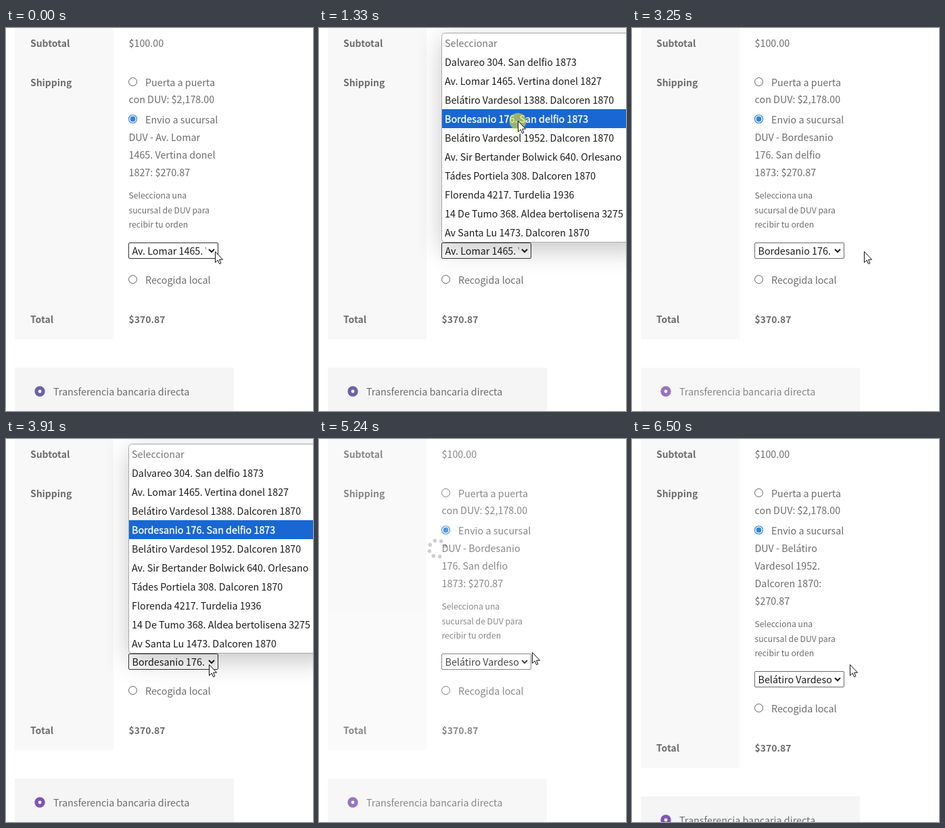
An HTML page that plays this animation: 454 by 566 pixels, repeating every 6.89 s.

```html
<!DOCTYPE html>
<html lang="es">
<head>
<meta charset="utf-8">
<title>Checkout</title>
<style>
  html, body { margin: 0; width: 100%; height: 100%; overflow: hidden; background: #fff; }
  svg { display: block; width: 100%; height: 100%; }
  text { font: 14.32px "Noto Sans CJK JP", "Noto Sans CJK SC", "Noto Sans CJK", "Source Sans Pro", sans-serif; fill: #6d6d6d; }
  text.bold { font-size: 13.95px; font-weight: 600; }
  text.small { font-size: 12.18px; }
  text.dark, #menu text { fill: #1c1c1c; }
  #menu text.hint { fill: #757575; }
  #menu text.on { fill: #fff; stroke: #fff; stroke-width: .35; }
  .off { fill: #fff; stroke: #606060; }
  #menuBox { fill: #fff; stroke: #a8a8a8; filter: drop-shadow(0 11px 18px rgba(0, 0, 0, .22)); }
</style>
</head>
<body>
<svg viewBox="0 0 454 566">
  <defs>
    <clipPath id="fieldClip"><rect x="183" y="318" width="112.5" height="22"/></clipPath>
  </defs>
  <rect id="cell" x="13" y="0" width="146" height="460" fill="#f8f8f8"/>
  <g id="top">
    <circle class="off" cx="187.5" cy="79.5" r="6"/>
    <circle cx="187.5" cy="134.5" r="6" fill="#fff" stroke="#2f83d8" stroke-width="1.2"/>
    <circle cx="187.5" cy="134.5" r="3.9" fill="#2f83d8"/>
  </g>
  <g id="low">
    <rect id="field" x="181.5" y="317.5" width="132" height="23" rx="1.5" fill="#fff"/>
    <g id="fieldText" clip-path="url(#fieldClip)"></g>
    <path d="M300 327l4 4 4-4" fill="none" stroke="#1c1c1c" stroke-width="2"/>
    <circle class="off" cx="187.5" cy="371.5" r="6"/>
    <rect x="13" y="502" width="324" height="90" fill="#f5f5f5"/>
    <circle id="payDot" cx="50" cy="537" r="7.7"/>
    <circle cx="50" cy="537" r="2.4" fill="#fff"/>
  </g>
  <g id="tableVeil">
    <rect x="13" y="0" width="324" height="460" fill="#fff"/>
    <g id="spinner"></g>
  </g>
  <rect id="payVeil" x="13" y="502" width="324" height="90" fill="#fff"/>
  <g id="menu">
    <rect id="menuBox" x="181.5" y="7.5" width="300" height="309" rx="5"/>
    <rect id="bar" x="182" width="300" height="28" fill="#1967d2"/>
  </g>
  <circle id="press" r="12.5" fill="#e2e03c" fill-opacity=".62"/>
  <path id="cursor" d="M.5 .5V16.6L4.2 13.1 6.6 18.6 8.9 17.6 6.6 12.2H11.6Z" fill="#fff" stroke="#111"/>
</svg>
<script>
const LOOP = 6890;
const NS = "http://www.w3.org/2000/svg";
const $ = id => document.getElementById(id);

function add(parent, tag, attrs, content = "") {
  const el = document.createElementNS(NS, tag);
  for (const k in attrs) el.setAttribute(k, attrs[k]);
  el.textContent = content;
  return parent.appendChild(el);
}
const write = (parent, x, y, content, cls = "") =>
  add(parent, "text", { x, y, class: cls }, content);

const upper = $("top"), low = $("low");
write(upper, 36, 28, "Subtotal", "bold");
write(upper, 181.5, 28, "$100.00");
write(upper, 36, 86, "Shipping", "bold");
write(upper, 206, 86, "Puerta a puerta");
write(upper, 181.5, 111, "con DUV: $2,178.00");
write(upper, 206, 141, "Envio a sucursal");
const lines = [167, 193, 219, 245].map(y => write(upper, 181.5, y, ""));

write(low, 181.5, 252, "Selecciona una", "small");
write(low, 181.5, 274, "sucursal de DUV para", "small");
write(low, 181.5, 295, "recibir tu orden", "small");
write(low, 206, 378, "Recogida local");
write(low, 36, 436, "Total", "bold");
write(low, 181.5, 436, "$370.87", "bold");
write(low, 70, 543, "Transferencia bancaria directa");

const options = [
  "Seleccionar",
  "Dalvareo 304. San delfio 1873",
  "Av. Lomar 1465. Vertina donel 1827",
  "Belátiro Vardesol 1388. Dalcoren 1870",
  "Bordesanio 176. San delfio 1873",
  "Belátiro Vardesol 1952. Dalcoren 1870",
  "Av. Sir Bertander Bolwick 640. Orlesano",
  "Tádes Portiela 308. Dalcoren 1870",
  "Florenda 4217. Turdelia 1936",
  "14 De Tumo 368. Aldea bertolisena 3275",
  "Av Santa Lu 1473. Dalcoren 1870"
];
const labels = [
  ["DUV - Av. Lomar", "1465. Vertina donel", "1827: $270.87", ""],
  ["DUV - Bordesanio", "176. San delfio", "1873: $270.87", ""],
  ["DUV - Belátiro", "Vardesol 1952.", "Dalcoren 1870:", "$270.87"]
];
const rows = options.map((s, i) => write($("menu"), 186, 28 + 28 * i, s, i ? "" : "hint"));
const fieldText = write($("fieldText"), 186.5, 335, "", "dark");

// seven dots, with a gap at the upper right
for (let i = 2; i < 9; i++) {
  const a = i * Math.PI / 4 - Math.PI / 2;
  add($("spinner"), "circle", { cx: 12.2 * Math.cos(a), cy: 12.2 * Math.sin(a), r: 2.8 });
}

// time, x, y
const path = [
  [0, 309, 330], [520, 308, 328], [720, 308, 328], [960, 300, 235], [1190, 294, 137],
  [1660, 294, 137], [1920, 322, 230], [2190, 343, 314], [2460, 343, 330],
  [3250, 343, 330], [3560, 300, 333], [3910, 300, 333], [4160, 291, 250],
  [4370, 284, 175], [4510, 284, 160], [4840, 284, 160], [5040, 300, 245],
  [5240, 315, 315], [5510, 322, 333], [LOOP, 322, 333]
];
const menus = [
  { open: 140, close: 1460, move: 720, row: 2 },
  { open: 3590, close: 4640, move: 3910, row: 4 }
];
const presses = [[70, 200], [1330, 1460], [3520, 3650], [4510, 4640]];
const loads = [
  { start: 1970, done: 3000 },
  { start: 5090, done: 6120 }
];
const FADE = 400, VEIL = 0.6;

function cursorAt(t) {
  const i = Math.max(1, path.findIndex(p => p[0] > t));
  const [t0, x0, y0] = path[i - 1], [t1, x1, y1] = path[i];
  const k = (t - t0) / (t1 - t0);
  return [x0 + (x1 - x0) * k, y0 + (y1 - y0) * k];
}
const swing = p => 0.5 - 0.5 * Math.cos(Math.PI * Math.min(1, Math.max(0, p)));
const show = (el, on) => el.setAttribute("visibility", on ? "visible" : "hidden");
const move = (el, x, y) => el.setAttribute("transform", `translate(${x} ${y})`);

// the highlight trails the pointer a little
function drawMenu(t) {
  const m = menus.find(m => t >= m.open && t < m.close);
  show($("menu"), m);
  if (!m) return false;
  const y = cursorAt(t - 65)[1];
  const row = t > m.move && y < 316 ? Math.floor((y - 8) / 28) : m.row;
  $("bar").setAttribute("y", 8 + 28 * row);
  rows.forEach((el, i) => el.classList.toggle("on", i === row));
  return true;
}

function draw(t) {
  const step = loads.filter(l => t >= l.done).length;
  const picked = menus.filter(m => t >= m.close).length;
  const shift = step === 2 ? 26 : 0;

  labels[step].forEach((s, i) => { lines[i].textContent = s; });
  fieldText.textContent = options[[2, 4, 5][picked]];
  move(low, 0, shift);
  move($("payVeil"), 0, shift);
  $("cell").setAttribute("height", 460 + shift);
  $("payDot").setAttribute("fill", step ? "#7f54b3" : "#6b62ac");

  const open = drawMenu(t);
  $("field").setAttribute("stroke", open || !step ? "#333" : "#6b6b6b");

  // the table is swapped at once, the payment box fades back
  let table = 0, pay = 0;
  for (const { start, done } of loads) {
    if (t < start || t > done + FADE) continue;
    const rise = VEIL * swing((t - start) / FADE);
    if (t < done) {
      table = rise;
      $("spinner").setAttribute("transform",
        `translate(175 162) rotate(${(t - start) / 750 * 360})`);
    }
    pay = t < done ? rise : VEIL * (1 - swing((t - done) / FADE));
  }
  $("tableVeil").setAttribute("opacity", table);
  $("payVeil").setAttribute("opacity", pay);

  const [x, y] = cursorAt(t).map(Math.round);
  move($("cursor"), x, y);
  move($("press"), x, y + 1);
  show($("press"), presses.some(([a, b]) => t >= a && t < b));
}

const origin = performance.now();
function tick() {
  draw((performance.now() - origin) % LOOP);
  requestAnimationFrame(tick);
}
draw(0);
requestAnimationFrame(tick);
</script>
</body>
</html>
```
